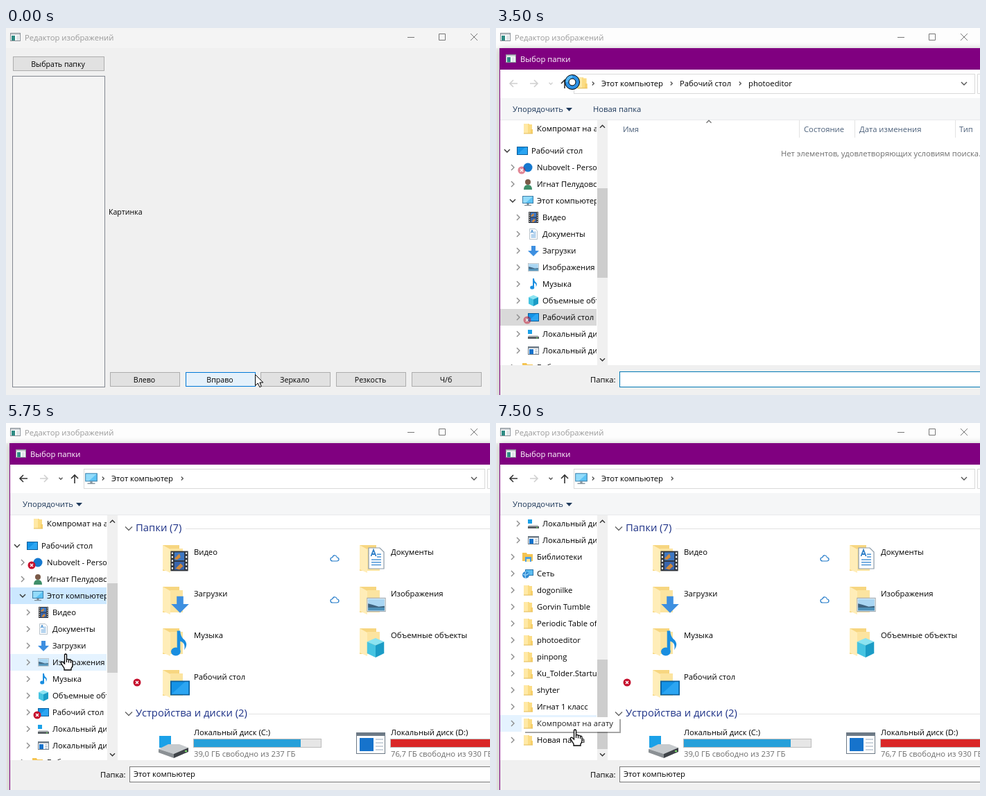
Animation, 698 px wide and 529 px high, one loop 8000 ms. Source, as an HTML page:

```html
<!DOCTYPE html>
<html lang="ru">
<head>
<meta charset="utf-8">
<style>
html, body { margin: 0; width: 100%; height: 100%; overflow: hidden; background: #f0f0f0; }
svg { display: block; width: 100%; height: 100%; }
text { font: 11.25px "Open Sans", "Noto Sans", sans-serif; white-space: pre; }
.ui { font-size: 10.6px; }
.big { font-size: 14.8px; fill: #1e3287; }
.mid { text-anchor: middle; }
.line { fill: none; stroke-width: 1.2; }
.shadow { filter: drop-shadow(0 1px 5px #0004); }
</style>
</head>
<body>
<svg id="stage" viewBox="0 0 698 529" preserveAspectRatio="none"></svg>
<script>
const rect = (x, y, w, h, fill, more = '') => `<rect x="${x}" y="${y}" width="${w}" height="${h}" fill="${fill}" ${more}/>`;
const box = (x, y, w, h, fill, stroke, more = '') => rect(x + .5, y + .5, w - 1, h - 1, fill, `stroke="${stroke}" ${more}`);
const text = (x, y, s, fill = '#000', cls = '') => `<text x="${x}" y="${y + 4}" fill="${fill}" class="${cls}">${s}</text>`;
const path = (d, fill, more = '') => `<path d="${d}" fill="${fill}" ${more}/>`;
const line = (d, stroke, more = '') => `<path d="${d}" class="line" stroke="${stroke}" ${more}/>`;
const group = (id, body) => `<g id="${id}">${body}</g>`;
const at = (x, y, body, s = 1) => `<g transform="translate(${x} ${y}) scale(${s})">${body}</g>`;

// direction: right, down, up
const turns = { r: 0, d: 90, u: -90 };
const chevron = (x, y, dir, size = 3.5, color = '#555') =>
  line(`M${-size / 2} ${-size}L${size / 2} 0L${-size / 2} ${size}`, color, `style="stroke-width:1.4" transform="translate(${x} ${y}) rotate(${turns[dir]})"`);

// icons are centred on a 16 unit square
const icons = {
  folder: path('M-6 -7H2V-6H6V7H-6z', '#fbdc84') + path('M-6 -7H0V7H-6z', '#ffe9a6') + path('M4 1H7V7H4z', '#f6cf6a') + line('M-6 7H7', '#e8c364'),
  desk: box(-8, -6, 16, 12, '#1493e6', '#0b5e9b') + path('M-7 5L4 -5H7V5z', '#2ba5f2'),
  pc: box(-8, -7, 16, 11, '#5cc3f5', '#3d7fa8') + path('M-7 -6H7L-3 3H-7z', '#93dbfa') + rect(-1.5, 4, 3, 2, '#7c8a94') + rect(-5, 6, 10, 1.2, '#7c8a94'),
  dot: '<circle r="6.5" fill="#1679cf"/>',
  user: path('M-6 8Q-6 1 0 1Q6 1 6 8z', '#3f8f6a') + '<circle cy="-3" r="4" fill="#7a5a48"/>',
  film: rect(-7, -8, 14, 16, '#30343a') + rect(-4, -7, 8, 6.5, '#3f78c4') + rect(-4, .5, 8, 6.5, '#3a66ae') +
    path('M-4 -2L0 -6L1 -3L-2 -1zM-3 6L1 2L3 4L0 7z', '#d28a3c') +
    line('M-5.6 -7V8M5.6 -7V8', '#fff', 'stroke-dasharray="1.5 1.5"'),
  doc: path('M-5.5 -7.5H2.5L5.5 -4.5V7.5H-5.5z', '#fff', 'stroke="#8a9aa8" stroke-width=".6"') +
    `<g transform="scale(1 .95)">${line('M.5 -3H3.5M.5 -1H3.5M-3.5 1H3.5M-3.5 3H3.5M-3.5 5H3.5', '#4a94d6', 'style="stroke-width:.8"')}</g>` +
    line('M-3.8 -1.5L-2 -6L-.2 -1.5M-3.2 -3H-.8', '#2f7fc8', 'style="stroke-width:.9"'),
  down: path('M-3 -7H3V0H8L0 8L-8 0H-3z', '#3d8fe0'),
  pic: box(-8, -6, 16, 12, '#fff', '#9aa5ad', 'stroke-width=".6"') + rect(-6.8, -4.8, 13.6, 9.6, '#a9d6f3') +
    path('M-6.8 2.5V-1L-3 0L2 1.5L6.8 1V2.5z', '#3f6480') + rect(-6.8, 2.3, 13.6, 2.5, '#4d90b8'),
  note: path('M-1 -8H1Q1 -4 4 -2Q6 1 3.5 4Q4.5 -.5 1 -1.5V5H-1z', '#1a8ee0') + '<ellipse cx="-1.8" cy="5" rx="3" ry="2.6" fill="#1a8ee0"/>',
  cube: path('M0 -8L7 -5L0 -2L-7 -5z', '#8be4f2') + path('M-7 -5L0 -2V8L-7 4.5z', '#45c4e2') + path('M7 -5L0 -2V8L7 4.5z', '#1b9cc6'),
  diskC: rect(-8, -6, 6, 6, '#1ba1e8') + path('M-7 2H6L8 4H-8z', '#c3c7ca') + rect(-8, 4, 16, 3, '#5a6066') + rect(4, 5, 2, 1.2, '#7be06a'),
  diskD: box(-8, -6, 16, 12, '#fff', '#6d7a86') + rect(-8, -6, 16, 2.5, '#6d7a86') + rect(-6, -2, 6, 7, '#1673cc') + line('M2 -1H6M2 1.5H6M2 4H6', '#9ab'),
  libs: path('M-8 -6H-2L-1 -4H7V6H-8z', '#f5c451') + rect(-4, 0, 9, 7, '#4a9fe0') + rect(-2, 3, 5, 4, '#ffe49a'),
  net: box(-4, -6, 12, 9, '#5cbcf0', '#2d76ab') + '<circle cx="-3" cy="2" r="5" fill="#2f8ad2"/>' + line('M-7 1Q-3 4 1 0M-3 -3Q-5 2 -3 7', '#9fd6f8'),
};
const icon = (name, x, y, s) => at(x, y, icons[name], s);
const badge = (x, y) => at(x, y, '<circle r="5.5" fill="#c50f2c"/>' + line('M-2 -2L2 2M2 -2L-2 2', '#fff', 'style="stroke-width:1.5"'));
const appIcon = (x, y) => at(x, y, box(0, 0, 15, 12, '#fff', '#8b9298') + rect(1, 1, 13, 2, '#c7cdd1') + rect(2, 4, 5, 7, '#2e8b84') + rect(9, 4, 4, 7, '#dfe5e8'));

const button = (x, y, w, s, id) =>
  box(x, y, w, 21, '#e1e1e1', '#adadad', `id="${id}"`) + text(x + w / 2 - 1, y + 11, s, '#000', 'ui mid');

const editor =
  rect(0, 0, 698, 529, '#f0f0f0') + rect(0, 0, 698, 29, '#f4f4f4', 'id="bar"') +
  appIcon(6, 7) + text(27, 14, 'Редактор изображений', '#999') +
  line('M579 13.5H589M624.5 8.5H633.5V17.5H624.5zM670 8L680 18M680 8L670 18', '#777', 'style="stroke-width:1"') +
  button(10, 41, 132, 'Выбрать папку', 'pick') +
  box(9, 69, 134, 449, '#f3f3f3', '#828790', 'id="list"') +
  text(148, 265, 'Картинка', '#000', 'ui') +
  ['Влево', 'Вправо', 'Зеркало', 'Резкость', 'Ч/б'].map((s, i) => button(Math.round(150 + i * 108.7), 496, 101, s, 'tool' + i)).join('');

const rows = [
  ['Компромат на агату', 1, 'folder'], ['Рабочий стол', 0, 'desk'], ['Nubovelt - Person', 1, 'dot'],
  ['Игнат Пелудовский', 1, 'user'], ['Этот компьютер', 1, 'pc'], ['Видео', 2, 'film'],
  ['Документы', 2, 'doc'], ['Загрузки', 2, 'down'], ['Изображения', 2, 'pic'], ['Музыка', 2, 'note'],
  ['Объемные объекты', 2, 'cube'], ['Рабочий стол', 2, 'desk'], ['Локальный диск', 2, 'diskC'],
  ['Локальный диск', 2, 'diskD'], ['Библиотеки', 1, 'libs'], ['Сеть', 1, 'net'],
  ...['dogonilke', 'Gorvin Tumble', 'Periodic Table of', 'photoeditor', 'pinpong', 'Ku_Tolder.Startu',
    'shyter', 'Игнат 1 класс', 'Компромат на агату', 'Новая папка'].map(s => [s, 1, 'folder']),
];
const rowY = i => i ? 153 + 24 * i : 145;
const open = [1, 4];
const row = ([s, depth, pic], i) => {
  const x = 16 + 8 * depth, y = rowY(i), down = open.includes(i);
  return (i ? chevron(x, y, down ? 'd' : 'r', 4, down ? '#333' : '#8c8c8c') : '') +
    icon(pic, x + 22, y) + text(x + 35, y, s);
};
const tree = `<clipPath id="pane"><rect x="6" y="133" width="139" height="353"/></clipPath>` +
  `<g clip-path="url(#pane)">` + group('tree',
    rect(6, 0, 139, 24, '#d9d9d9', 'id="chosen"') + rect(6, 0, 139, 24, '#e5f3ff', 'id="hover"') +
    rows.map(row).join('') + group('badges', badge(37, 205) + badge(45, 421))) + '</g>' +
  rect(146, 133, 15, 353, '#f0f0f0') + rect(146, 231, 15, 129, '#cdcdcd', 'id="thumb"') +
  chevron(153.5, 142, 'u', 3.5, '#333') + chevron(153.5, 478, 'd', 3.5, '#333');

const thick = 'style="stroke-width:1.6"';
const nav = (back, drop) =>
  line('M31 80H20M25 75L20 80L25 85', back, thick) +
  line('M49 80H60M55 75L60 80L55 85', '#d0d0d0', thick) + chevron(79, 80, 'd', 2.5, drop);
const crumbs = (...parts) => parts.map(([x, s]) => text(x, 80, s) + chevron(x - 12, 80, 'r', 2.5)).join('');

const empty = nav('#d0d0d0', '#d0d0d0') + icon('folder', 124, 79, 1.1) +
  crumbs([152, 'Этот компьютер'], [265, 'Рабочий стол'], [364, 'photoeditor']) +
  text(140, 117, 'Новая папка', '#1e395b') +
  [[183, 'Имя'], [444, 'Состояние'], [524, 'Дата изменения'], [668, 'Тип']].map(([x, s]) => text(x, 146, s, '#4c607a')).join('') +
  line('M437.5 133V158M517.5 133V158M662.5 133V158', '#e3e3e3', 'style="stroke-width:1"') + chevron(307, 135, 'u', 3.5, '#777') +
  text(411, 181, 'Нет элементов, удовлетворяющих условиям поиска.', '#6d6d6d') +
  box(178, 495, 540, 23, '#fff', '#0078b4');

const head = (y, s, x) => chevron(177, y, 'd', 5, '#666') + text(187, y, s, '', 'big') + line(`M${x} ${y + .5}H698`, '#e2e2e2');
const place = (x, y, s, pic, dx, dy, scale) =>
  at(x, y, path('M1 -10H25V27H1z', '#f7d680') + path('M12 -5H30V27H12z', '#fce4a0') + path('M1 -10L12 -4V30L1 25z', '#ffedb8')) +
  icon(pic, x + dx, y + dy, scale) + text(x + 46, y, s);
const cloud = (x, y) => line('M-3 4Q-6 4 -6 1Q-6 -1 -3 -1.5Q-2 -5 1 -4Q3 -3.5 3.5 -1Q6 -1 6 1.5Q6 4 3 4z', '#1f78c8', `transform="translate(${x} ${y})"`);
const disk = (x, s, note, used, color) => text(x + 1, 446, s) + box(x, 455, 185, 13, '#e6e6e6', '#bcbcbc') +
  rect(x + 1, 456, used, 11, color) + text(x + 1, 477, note, '#6d6d6d');

const computer = nav('#333', '#555') + icon('pc', 123, 80, 1.1) + crumbs([152, 'Этот компьютер']) + chevron(254, 80, 'r', 2.5) +
  head(152, 'Папки (7)', 259) +
  place(225, 186, 'Видео', 'film', 25, 13, 1.8) + place(509, 186, 'Документы', 'doc', 25, 9, 2) +
  place(225, 246, 'Загрузки', 'down', 26, 15, 1.6) + place(509, 246, 'Изображения', 'pic', 25, 16, 1.75) +
  place(225, 306, 'Музыка', 'note', 24, 12, 2.3) + place(509, 306, 'Объемные объекты', 'cube', 24, 18, 1.75) +
  place(225, 366, 'Рабочий стол', 'desk', 26, 16, 1.75) +
  cloud(474, 195) + cloud(474, 255) + badge(189, 374) +
  head(419, 'Устройства и диски (2)', 350) +
  rect(221, 451, 17, 17, '#1ba1e8') + path('M220 470L234 463H250L263 468L242 477z', '#c6cacd') +
  path('M220 470L242 477V483L220 475z', '#8b9094') + path('M242 477L263 468V474L242 483z', '#3f4449') + rect(258, 472, 3, 2, '#7be06a') +
  disk(270, 'Локальный диск (C:)', '39,0 ГБ свободно из 237 ГБ', 154, '#26a0da') +
  box(505, 446, 42, 31, '#fff', '#6d7a86') + rect(505, 446, 42, 5, '#6d7a86') + rect(510, 454, 20, 19, '#1673cc') +
  line('M533 456H544M533 461H544M533 466H544M533 471H544', '#9ab') +
  disk(554, 'Локальный диск (D:)', '76,7 ГБ свободно из 930 ГБ', 169, '#da2626') +
  box(178, 495, 540, 23, '#fff', '#7a7a7a') + text(184, 506, 'Этот компьютер');

const dialog =
  rect(5, 29, 720, 520, '#800080', 'class="shadow"') + rect(6, 60, 692, 469, '#fff') +
  appIcon(14, 38) + text(35, 45, 'Выбор папки', '#fff') +
  box(112, 66, 579, 29, '#fff', '#d9d9d9') + chevron(675, 80, 'd', 4) + line('M698 66.5H694.5V94.5H698', '#d9d9d9', 'style="stroke-width:1"') +
  line('M99 87V75M94 80L99 75L104 80', '#333', thick) +
  rect(6, 101, 692, 31, '#f5f6f7') + rect(6, 132, 692, 1, '#e8eaec') +
  text(24, 117, 'Упорядочить', '#1e395b') + path('M101 115H110L105.5 120z', '#1e395b') +
  rect(6, 486, 692, 43, '#f0f0f0') + text(136, 507, 'Папка:') +
  tree + group('empty', empty) + group('computer', computer) +
  group('tip', rect(42, 427, 138, 20, '#000', 'opacity=".35"') + rect(37, 424, 141, 21, '#fff') +
    icon('folder', 46, 433) + text(59, 433, 'Компромат на агату', '#222'));

const pointers =
  group('arrow', path('M.5 .5V16.5L4.3 13L6.8 18.6L9.3 17.5L6.9 12H11.8z', '#fff', 'stroke="#000"')) +
  group('busy', '<circle r="10.5" fill="#2b90e6" stroke="#000"/>' + line('M-7.8 0A7.8 7.8 0 0 1 0 -7.8', '#55b8f8', 'style="stroke-width:4"') +
    '<circle r="5" fill="#fff" stroke="#000"/>') +
  group('hand', path('M-1.5 0Q0 -2 1.5 0V7Q3.5 5.5 4.5 7.5Q6.5 6.5 7.5 8.5Q10 7.5 10 10.5V15Q10 18 8 19.5V22H-2V19.5L-6.5 12.5Q-7 9.5 -4 10.5L-1.5 13z', '#fff', 'stroke="#000" stroke-width="1.3"') +
    line('M1.5 7V11M4.5 7.5V11.5M7.5 8.5V12', '#000'));

stage.innerHTML = editor + group('dialog', dialog) + pointers;

const get = id => document.getElementById(id);
const show = (id, on) => get(id).style.display = on ? '' : 'none';
const set = (id, attrs) => { for (const a in attrs) get(id).setAttribute(a, attrs[a]); };
const light = (id, on) => set(id, on ? { fill: '#e5f1fb', stroke: '#0078d7' } : { fill: '#e1e1e1', stroke: '#adadad' });

// pointer stops: step, x, y
const stops = [[0, 359, 499], [1, 300, 478], [3, 110, 457], [4, 98, 478], [7, 98, 478], [8, 323, 513], [9, 300, 500],
  [12, 112, 50], [13, 110, 78], [14, 110, 78], [15, 70, 220], [16, 55, 304], [18, 60, 250], [20, 62, 252],
  [23, 86, 334], [27, 110, 434], [28, 114, 443], [32, 114, 443]];
function pointerAt(k) {
  const i = stops.findIndex(s => s[0] > k), [k0, x0, y0] = stops[i - 1], [k1, x1, y1] = stops[i];
  const p = (k - k0) / (k1 - k0);
  return [Math.round(x0 + (x1 - x0) * p), Math.round(y0 + (y1 - y0) * p)];
}

const STEP = 250, LOOP = 8000;
let shown = -1;
function draw(k) {
  const [x, y] = pointerAt(k);
  const scroll = k < 25 ? 0 : k > 27 ? 296 : 56 + 72 * (k - 25);
  const kind = k < 13 ? 'arrow' : k < 15 ? 'busy' : 'hand';
  for (const id of ['arrow', 'busy', 'hand']) show(id, id === kind);
  set(kind, { transform: `translate(${x} ${y})` });

  light('tool1', k === 0 || k === 9);
  light('pick', k === 12 || k === 13);
  set('list', { fill: k < 12 ? '#f3f3f3' : '#fafafa' });
  set('bar', { fill: k < 14 ? '#f4f4f4' : '#fdfdfd' });

  show('dialog', k >= 14);
  show('empty', k < 19);
  show('computer', k >= 19);
  show('tip', k >= 30);
  show('hover', kind === 'hand');
  set('hover', { y: rowY(Math.round((y - 153 + scroll) / 24)) - 12 });
  set('chosen', { y: rowY(k < 18 ? 11 : 4) - 12, fill: k < 18 ? '#d9d9d9' : '#cce8ff' });
  set('badges', { opacity: k < 17 ? .5 : 1 });
  set('tree', { transform: `translate(0 ${-scroll})` });
  set('thumb', { y: Math.round(231 + scroll * .37) });
}
const start = performance.now();
function tick() {
  const k = Math.floor((performance.now() - start) % LOOP / STEP);
  if (k !== shown) draw(shown = k);
  requestAnimationFrame(tick);
}
tick();
</script>
</body>
</html>
```
